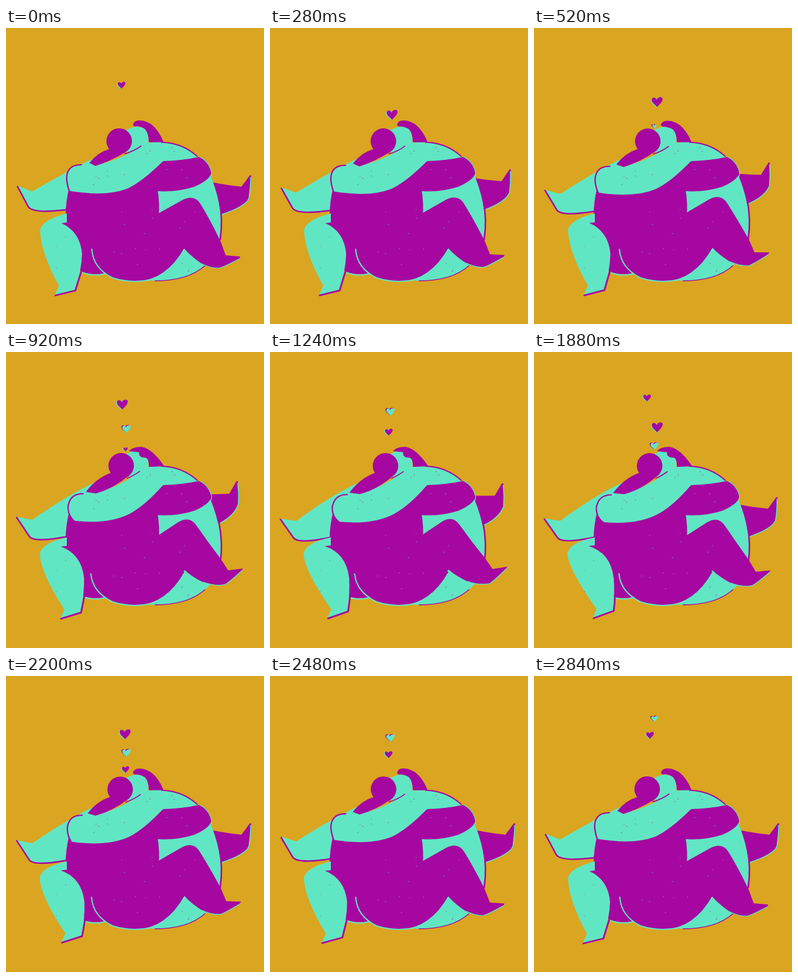
An HTML page with a canvas that plays this animation: 424 px wide and 487 px high, repeating every 2880 ms.

```html
<!DOCTYPE html>
<html lang="en">
<head>
<meta charset="utf-8">
<title>Hug</title>
<style>
html, body { margin: 0; width: 100%; height: 100%; overflow: hidden; background: #daa520; }
canvas { display: block; }
</style>
</head>
<body>
<canvas width="424" height="487"></canvas>
<script>
const ctx = document.querySelector("canvas").getContext("2d");
const GOLD = "#daa520", PURPLE = "#a607a0", TEAL = "#61e6c3";
const LOOP = 2880, STEP = 40;

// Each track runs from rest (0) to full swing (1) and back.
const TIMES = [0, 520, 920, 1560, 1880, 2200, 2840, 2880];
const TRACKS = {
  still: [0, 0, 0, 0, 0, 0, 0, 0],
  arm: [0, .25, .82, 1, 1, .4, 0, 0],
  hair: [0, .1, 1, 1, .97, .05, 0, 0],
  rearLeft: [0, .4, .7, 1, .87, .63, 0, 0],
  frontLeft: [0, .1, .55, 1, 1, .65, 0, 0],
  rearRight: [0, .7, 1, .63, .12, 0, 0, 0],
  frontRight: [0, .28, .82, 1, .7, .2, 0, 0]
};

// Monotone cubic interpolation, flat at the extremes.
function sample(values, t) {
  const secant = i => (values[i + 1] - values[i]) / (TIMES[i + 1] - TIMES[i]);
  const slope = i => {
    if (i === 0 || i === TIMES.length - 1) return 0;
    const a = secant(i - 1), b = secant(i);
    return a * b > 0 ? 2 * a * b / (a + b) : 0;
  };
  let i = 0;
  while (t >= TIMES[i + 1]) i++;
  const span = TIMES[i + 1] - TIMES[i], u = (t - TIMES[i]) / span, v = 1 - u;
  return values[i] * (1 + 2 * u) * v * v + slope(i) * span * u * v * v
    + values[i + 1] * u * u * (3 - 2 * u) - slope(i + 1) * span * u * u * v;
}

const lerp = (a, b, k) => a + (b - a) * k;

function mixPath(from, to, k) {
  const ends = to.match(/[\d.]+/g);
  let i = 0;
  return new Path2D(from.replace(/[\d.]+/g, n => lerp(+n, +ends[i++], k)));
}

const fill = (track, color, from, to = from) => ({ track, color, from, to });
const line = (track, color, width, from, to = from) => ({ track, color, width, from, to });

// Back to front.
const PARTS = [
  fill("rearRight", PURPLE,
    "M330 254 L340 254 Q365 259 387 261 L401 242 L403 243 Q402 265 399 281 Q393 293 354 307 L330 307Z",
    "M330 234 L338 234 Q350 234 367 233 L379 212 L381 213 Q383 233 382 250 Q376 268 351 282 L330 290Z"),
  line("rearRight", TEAL, 1.6,
    "M402 246 Q402 265 399 281 Q393 294 354 307",
    "M381 216 Q383 233 382 250 Q376 269 351 282"),

  // Large round body behind
  fill("still", TEAL,
    "M225 190 Q262 184 290 196 Q318 207 337 245 Q355 290 354 335 Q352 372 325 392 Q298 417 240 416 L200 400 L200 230Z"),
  line("still", PURPLE, 2, "M256 188 Q290 189 314 211"),
  line("still", PURPLE, 2.5, "M350 280 Q357 315 352 348"),
  line("still", PURPLE, 1.3, "M327 391 Q299 416 245 416"),

  fill("rearLeft", TEAL,
    "M145 214 Q110 230 43 269 L20 260 L38 295 Q52 306 110 299 L130 290Z",
    "M145 215 Q100 236 43 279 L17 276 L40 306 Q48 318 110 304 L130 290Z"),
  line("rearLeft", PURPLE, 2.5,
    "M19 261 L36 293 Q42 306 99 299",
    "M17 277 L38 306 Q44 318 98 306"),

  // Body in front
  fill("still", PURPLE,
    "M104 262 Q98 285 98 310 L90 321 L98 345 Q110 390 124 401 Q140 407 162 404 Q185 418 215 417 Q264 414 293 362 L251 309 Q253 290 249 265 L200 230Z"),
  line("still", TEAL, 2, "M125 402 Q145 410 163 404"),
  line("frontRight", TEAL, 2,
    "M141 364 Q143 395 175 411 Q205 421 240 414",
    "M139 365 Q142 395 175 411 Q205 421 240 414"),

  fill("frontRight", PURPLE,
    "M225 320 L245 308 L290 283 Q310 273 320 290 Q337 318 353 352 L361 374 L385 376 L383 380 Q360 392 352 395 Q340 397 325 390 Q305 377 293 363 L250 380Z",
    "M225 320 L241 307 L282 279 Q300 268 311 284 Q331 312 353 338 L366 356 L390 352 L389 355 Q372 373 362 380 Q345 383 325 377 Q305 368 294 358 L250 380Z"),
  line("frontRight", TEAL, 1.3,
    "M383 380 Q360 392 351 395 Q338 396 322 388",
    "M389 355 Q372 373 362 380 Q345 384 325 377"),

  fill("frontLeft", TEAL,
    "M100 305 Q60 315 56 332 Q57 370 87 424 L80 439 L113 431 Q124 400 125 372 Q122 335 91 321 L100 320Z",
    "M100 305 Q58 313 55 332 Q56 357 103 423 L97 437 L130 425 Q133 395 131 372 Q126 330 89 319 L100 318Z"),
  line("frontLeft", PURPLE, 2.8,
    "M81 440 L114 432 Q120 412 124 400",
    "M98 438 L131 426 Q133 410 133 400"),

  fill("still", PURPLE,
    "M200 270 L258 219 Q290 218 318 212 Q333 218 337 236 Q339 248 310 261 Q280 271 245 268Z"),
  line("still", TEAL, 1.2, "M318 212 Q334 220 338 238 Q338 245 333 250"),

  // Heads, shoulders and the embracing arm
  fill("hair", TEAL,
    "M195 170 Q212 157 230 166 Q236 180 233 195 L200 206 L190 190Z"),
  fill("arm", TEAL,
    "M104 268 Q96 245 103 234 Q108 225 124 225 L147 226 Q190 216 222 194 Q240 186 262 190 L275 215 L258 219 Q225 252 200 264 Q165 278 104 268Z",
    "M115 280 Q100 268 104 252 Q108 236 127 235 L148 233 Q185 223 219 197 Q240 186 262 190 L275 215 L258 219 Q230 252 205 266 Q170 285 115 280Z"),
  line("arm", PURPLE, 2.2,
    "M104 268 Q96 245 103 234 Q108 225 124 225",
    "M106 273 Q100 258 104 250 Q109 235 127 235"),
  fill("hair", PURPLE,
    "M209 160 Q209 152 220 152 Q245 153 259 188 L235 188 Q234 172 228 166 Q220 161 211 162Z",
    "M202 163 Q208 156 222 156 Q240 158 260 188 L235 189 Q235 176 230 174 Q217 174 219 165Z"),
  fill("arm", PURPLE,
    "M137 222 Q150 205 170 199 L198 203 Q175 218 147 227Z",
    "M130 232 Q148 208 172 199 L202 204 Q178 226 148 234Z"),
  line("arm", PURPLE, 1.6, "M195 207 Q210 203 222 194", "M200 208 Q211 203 219 197")
];

const HEART = new Path2D("M0 8 C-3 4 -9 1 -9 -4 C-9 -8 -3 -9 -1 -4 C1 -9 9 -10 9 -5 C9 0 3 4 0 8Z");
const HEARTS = {
  large: { size: 1, y: 162, color: PURPLE, edge: TEAL, x: age => 202 - ((age - 400) / 135) ** 2 },
  teal: { size: .76, y: 163, color: TEAL, edge: PURPLE, x: () => 197.5 },
  small: { size: .7, y: 162, color: PURPLE, edge: TEAL, x: age => 196 - (age / 300) ** 2 }
};
const BIRTHS = [
  [65, "large"], [510, "teal"], [900, "small"],
  [1450, "large"], [1790, "teal"], [2110, "small"]
];

function drawHeart(kind, age) {
  const { size, y: start, color, edge, x } = HEARTS[kind];
  const y = start - .088 * age;
  const top = kind === "large" ? 75 : 70;
  if (y < top) return;
  const scale = size * Math.min(1, .45 + age / 180, .7 + (y - top) / 8);
  const stamp = (paint, dx, dy) => {
    ctx.save();
    ctx.translate(x(age) + dx, y + dy);
    ctx.scale(scale, scale);
    ctx.fillStyle = paint;
    ctx.fill(HEART);
    ctx.restore();
  };
  stamp(edge, -1, kind === "teal" ? -.8 : .5);
  stamp(color, .5, 0);
}

// Grain: [color, count, x, y, width, height, slant]
const GRAIN = [
  [TEAL, 12, 155, 285, 105, 115, 0],
  [TEAL, 3, 260, 225, 65, 30, 0],
  [TEAL, 3, 270, 300, 45, 45, 0],
  [PURPLE, 6, 125, 240, 80, 24, -.2],
  [PURPLE, 4, 215, 195, 65, 20, 0],
  [PURPLE, 3, 80, 335, 28, 60, 0],
  [PURPLE, 3, 268, 385, 35, 18, 0]
];
let seed = 7;
const random = () => (seed = seed * 16807 % 2147483647) / 2147483647;
const SPECKS = GRAIN.flatMap(([color, count, x, y, w, h, slant]) =>
  Array.from({ length: count }, () => {
    const dx = random() * w;
    return { color, x: x + dx, y: y + random() * h + dx * slant, length: .3 + random() * 1.2 };
  }));

function drawSpeck({ color, x, y, length }) {
  ctx.strokeStyle = color;
  ctx.lineWidth = .6;
  ctx.beginPath();
  ctx.moveTo(x, y);
  ctx.lineTo(x + length, y - length * .7);
  ctx.stroke();
}

function draw(t) {
  const pose = {};
  for (const name in TRACKS) pose[name] = sample(TRACKS[name], t);

  ctx.fillStyle = GOLD;
  ctx.fillRect(0, 0, 424, 487);
  ctx.lineCap = ctx.lineJoin = "round";

  for (const { track, color, width, from, to } of PARTS) {
    const path = mixPath(from, to, pose[track]);
    ctx.fillStyle = ctx.strokeStyle = color;
    ctx.lineWidth = width || 1;
    if (width) ctx.stroke(path);
    else ctx.fill(path);
  }

  ctx.fillStyle = PURPLE;
  ctx.beginPath();
  ctx.arc(lerp(186, 190, pose.arm), lerp(186, 187.3, pose.arm), 21, 0, 7);
  ctx.fill();

  SPECKS.forEach(drawSpeck);
  for (const [born, kind] of BIRTHS) drawHeart(kind, (t - born + LOOP) % LOOP);
}

function tick() {
  draw(Math.floor(performance.now() % LOOP / STEP) * STEP);
  requestAnimationFrame(tick);
}
tick();
</script>
</body>
</html>
```
